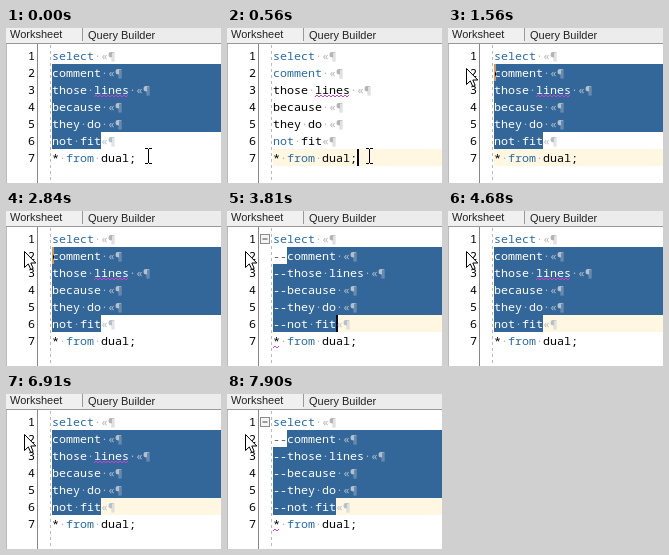
An HTML page that plays this animation: 215x155 px, repeating every 8 s.

```html
<!DOCTYPE html>
<html lang="en">
<head>
<meta charset="utf-8">
<title>Toggle line comments</title>
<style>
html, body { margin: 0; width: 100%; height: 100%; overflow: hidden; background: #fff; }
svg { display: block; width: 215px; height: 155px; }
text { white-space: pre; }
.ui { font: 11px "Liberation Sans", Arial, sans-serif; fill: #222; }
.code text, .nums { font: 11.667px "Noto Sans Mono", "DejaVu Sans Mono", monospace; fill: #000; }
.code .kw { fill: #2a6aa5; }
.code .mark { fill: #b4b4b4; }
.code .dash { fill: #555; }
.code .on text, .code .on .kw { fill: #fff; }
.code .on .mark { fill: #b4c0cc; }
.wave { fill: none; stroke: #d040d0; stroke-width: 1; }
#caret { fill: #fff; mix-blend-mode: difference; }
</style>
</head>
<body>
<svg viewBox="0 0 215 155">
  <rect width="215" height="155" fill="#fff"/>
  <rect width="215" height="15" fill="#ececec"/>
  <rect width="76" height="15" fill="#f0f0f0"/>
  <rect x="76" width="1" height="13" fill="#999"/>
  <rect y="15" width="215" height="1" fill="#999"/>
  <rect y="16" width="1" height="139" fill="#bbb"/>
  <rect x="31" y="16" width="1" height="139" fill="#888"/>
  <path d="M44.5 17V155" stroke="#bbb" stroke-dasharray="3 3"/>
  <text class="ui" x="4" y="10">Worksheet</text>
  <text class="ui" x="82" y="11">Query Builder</text>
  <g id="nums"></g>
  <rect id="hl" x="46" width="169" height="17" fill="#fff7e1"/>
  <path id="sel" fill="#336699"/>
  <g id="code" class="code"></g>
  <path id="wavyWord" class="wave"/>
  <path id="wavyStar" class="wave"/>
  <g id="fold">
    <rect x="33.5" y="23.5" width="9" height="9" fill="#f4f4f4" stroke="#8c8c8c"/>
    <path d="M35.5 28H40.5" stroke="#444"/>
  </g>
  <rect id="caret" width="2" height="17"/>
  <path id="beam" d="M0 .5H3M4 .5H7M3.5 1V15M0 15.5H3M4 15.5H7" fill="none" stroke="#000"/>
  <path id="arrow" transform="translate(18 40)" fill="#fff" stroke="#000"
    d="M.5 .5V16.5L4.3 12.9L6.8 18.5L9.2 17.4L6.8 12H11.8Z"/>
</svg>
<script>
const LEFT = 46, CH = 7, ROW = 17, LOOP = 8000;
const $ = id => document.getElementById(id);
const rowY = n => 19 + (n - 1) * ROW;
const baseline = n => rowY(n) + 13;

const lines = ["select «¶", "comment «¶", "those lines «¶", "because «¶",
  "they do «¶", "not fit«¶", "* from dual;"];

const span = (cls, s) => `<tspan class="${cls}">${s}</tspan>`;
const paint = s => s.replace(/select|comment|not|from| |«¶/g, m =>
  m === " " ? span("mark", "·") : span(m === "«¶" ? "mark" : "kw", m));

$("code").innerHTML = lines.map((s, i) => {
  const y = baseline(i + 1);
  return `<g><text class="dash" x="${LEFT}" y="${y}">--</text>` +
    `<text x="${LEFT}" y="${y}">${paint(s)}</text></g>`;
}).join("");
$("nums").innerHTML = lines.map((s, i) =>
  `<text class="nums" x="22" y="${baseline(i + 1)}">${i + 1}</text>`).join("");

function wave(col, n, chars) {
  const x = LEFT + col * CH, y = rowY(n) + 16;
  let d = `M${x} ${y}`;
  for (let i = 1; i <= chars * CH / 2; i++) d += `L${x + i * 2} ${y - i % 2 * 2}`;
  return d;
}
$("wavyWord").setAttribute("d", wave(6, 3, 5));
$("wavyStar").setAttribute("d", wave(0, 7, 1));

// Each step changes part of the state: sel = first selected row, hl = current row,
// caret = [column, row], beam = [x, y].
const commented = { dash: 1, word: 0, hl: 6, caret: [9, 6] };
const restored = { dash: 0, caret: [7, 6] };
const parsed = { fold: 1, star: 1 };
const cleared = { fold: 0, star: 0, word: 1 };
const off = { caret: 0 };
const steps = [
  [0, { sel: 2, beam: [139, 120], word: 1 }],
  [560, { sel: 0, hl: 7, caret: [12, 7] }],
  [1000, { caret: 0, beam: [122, 113] }],
  [1130, { beam: [110, 107] }],
  [1280, { beam: [92, 106] }],
  [1410, { sel: 5, caret: [0, 5], beam: [45, 79] }],
  [1560, { sel: 2, caret: [0, 2], beam: 0, arrow: 1 }],
  [1970, { hl: 0 }],
  [2400, off],
  [2840, { caret: [0, 2] }],
  [2970, commented],
  [3120, { fold: 1 }],
  [3250, { star: 1 }],
  [3400, off],
  [3810, { caret: [9, 6] }],
  [4090, restored],
  [4400, cleared],
  [4680, off],
  [5080, { caret: [7, 6] }],
  [5240, commented],
  [5520, parsed],
  [5790, off],
  [6200, { caret: [9, 6] }],
  [6480, restored],
  [6760, cleared],
  [6910, off],
  [7480, commented],
  [7780, parsed],
  [7900, off]
];
let last = {};
const states = steps.map(([at, change]) => [at, last = { ...last, ...change }]);

const show = (id, on) => $(id).style.display = on ? "" : "none";
const place = (id, x, y) => $(id).setAttribute("transform", `translate(${x} ${y})`);

function selection(s) {
  if (!s.sel) return "";
  const shift = s.dash ? 2 * CH : 0;
  const bar = (x, n, end) => `M${x} ${rowY(n)}H${end}v${ROW}H${x}Z`;
  let d = bar(LEFT, 6, LEFT + 7 * CH + shift);
  for (let n = s.sel; n < 6; n++) d += bar(LEFT + (n === s.sel ? shift : 0), n, 215);
  return d;
}

function draw(s) {
  [...$("code").children].forEach((g, i) => {
    const n = i + 1, dashed = s.dash && n > 1 && n < 7;
    const [dash, text] = g.children;
    g.setAttribute("class", s.sel && n >= s.sel && n < 7 ? "on" : "");
    dash.style.display = dashed ? "" : "none";
    dash.style.fill = n === s.sel ? "#555" : "";
    text.setAttribute("x", LEFT + (dashed ? 2 * CH : 0));
  });
  $("sel").setAttribute("d", selection(s));
  show("hl", s.hl);
  if (s.hl) $("hl").setAttribute("y", rowY(s.hl));
  show("caret", s.caret);
  if (s.caret) place("caret", LEFT + s.caret[0] * CH, rowY(s.caret[1]));
  show("beam", s.beam);
  if (s.beam) place("beam", ...s.beam);
  show("arrow", s.arrow);
  show("fold", s.fold);
  show("wavyStar", s.star);
  show("wavyWord", s.word);
}

const start = performance.now();
let current;
function tick() {
  const t = (performance.now() - start) % LOOP;
  const state = states.filter(([at]) => at <= t).pop()[1];
  if (state !== current) draw(current = state);
  requestAnimationFrame(tick);
}
tick();
</script>
</body>
</html>
```
